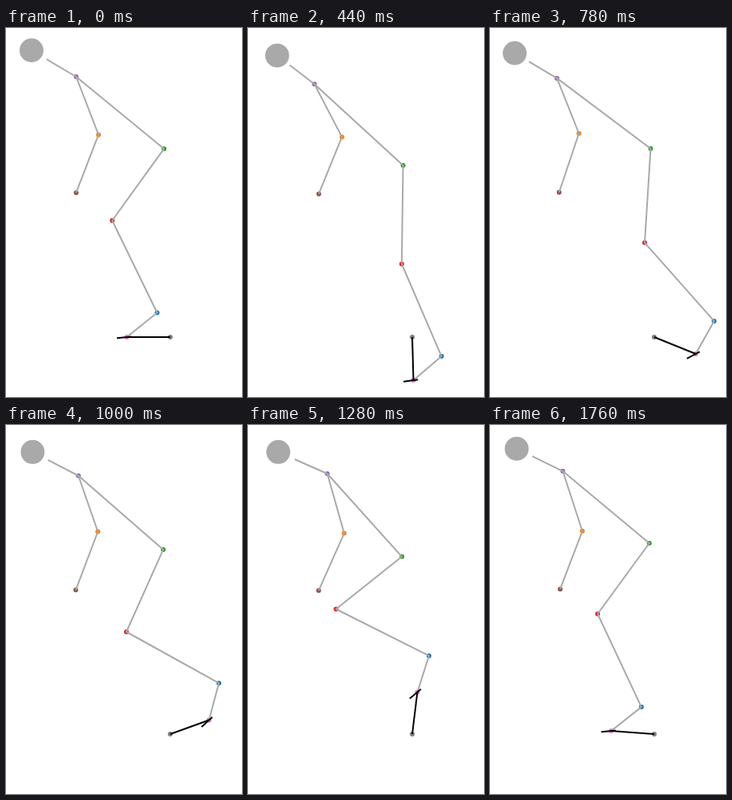
These frames come from a looping animation (296 by 462 pixels, 1.78 s). An HTML page with a canvas:

```html
<!DOCTYPE html>
<html lang="en">
<head>
<meta charset="utf-8">
<title>Pedalling figure</title>
<style>
  html, body { margin: 0; width: 100%; height: 100%; overflow: hidden; background: #fff; }
  canvas { display: block; width: 296px; height: 462px; }
</style>
</head>
<body>
<canvas id="stage" width="296" height="462"></canvas>
<script>
const ctx = document.getElementById('stage').getContext('2d');
const LOOP = 1780, STEP = 20;
const GRAY = '#a9a9a9', BLACK = '#000';
const CRANK = [206, 387];
const KEYS = [0, 440, 780, 1000, 1280, 1500, 1760];

// Natural cubic spline through the key times
function spline(ys) {
  const n = KEYS.length, m = Array(n).fill(0), c = Array(n).fill(0), d = Array(n).fill(0);
  const gap = i => KEYS[i + 1] - KEYS[i];
  const slope = i => (ys[i + 1] - ys[i]) / gap(i);
  for (let i = 1; i < n - 1; i++) {
    const p = 2 * (gap(i - 1) + gap(i)) - gap(i - 1) * c[i - 1];
    c[i] = gap(i) / p;
    d[i] = (6 * (slope(i) - slope(i - 1)) - gap(i - 1) * d[i - 1]) / p;
  }
  for (let i = n - 2; i > 0; i--) m[i] = d[i] - c[i] * m[i + 1];
  return t => {
    let i = 0;
    while (i < n - 2 && t > KEYS[i + 1]) i++;
    const h = gap(i), b = (t - KEYS[i]) / h, a = 1 - b;
    return a * ys[i] + b * ys[i + 1]
      + ((a ** 3 - a) * m[i] + (b ** 3 - b) * m[i + 1]) * h * h / 6;
  };
}

function track(xs, ys) {
  const x = spline(xs), y = spline(ys);
  return t => [x(t), y(t)];
}

const head = track([32, 36.6, 31, 33.4, 38, 34.8, 33.5], [28, 34.4, 31.5, 33.8, 33.8, 29.8, 29.7]);
const shoulder = track([88, 83.3, 84, 90.8, 99.5, 97.6, 91.3], [61, 70.2, 62.9, 63.5, 61, 56.6, 57.8]);
const elbow = track([116, 117.8, 111.5, 115.2, 120.6, 117.4, 115.8], [133.7, 136.4, 132, 133.5, 135.6, 133.3, 132.8]);
const wrist = track([88, 88.8, 86.7, 87.5, 88.6, 88, 88], [206.2, 207.7, 205.8, 206.6, 207.3, 206, 205.4]);
const hip = track([198.2, 194.5, 201.5, 197.2, 193, 198.2, 199.8], [151.2, 172, 151, 155.9, 164.8, 152, 148]);
const knee = track([133.2, 192.8, 194, 151, 110.4, 112.3, 135], [241, 295.5, 268.8, 259, 230.5, 211.8, 236.5]);
const crankAngle = spline([180, 88.4, 22, -19.8, -83, -125.2, -175.8]);
const crankLength = spline([54.5, 54, 56.1, 51.6, 52.9, 56.3, 54.2]);
const footAngle = spline([38.7, 40.4, 60.7, 75, 72.3, 53, 38.3]);
const footLength = spline([48.7, 46.2, 47.1, 48, 47.8, 48.9, 48.3]);

function polar([x, y], degrees, r) {
  const a = degrees * Math.PI / 180;
  return [x + r * Math.cos(a), y + r * Math.sin(a)];
}

function dot([x, y], r, color) {
  ctx.fillStyle = color;
  ctx.beginPath();
  ctx.arc(x, y, r, 0, 2 * Math.PI);
  ctx.fill();
}

function line(color, ...points) {
  ctx.strokeStyle = color;
  ctx.beginPath();
  points.forEach(p => ctx.lineTo(...p));
  ctx.stroke();
}

function draw(t) {
  const skull = head(t), neck = shoulder(t), arm = elbow(t), hand = wrist(t);
  const pelvis = hip(t), leg = knee(t), tilt = -footAngle(t);
  const pedal = polar(CRANK, crankAngle(t), crankLength(t));
  const ankle = polar(pedal, tilt, footLength(t));
  const chin = neck.map((v, i) => v + (skull[i] - v) * 0.663);
  const sole = tilt + 32.5;

  ctx.fillStyle = '#fff';
  ctx.fillRect(0, 0, 296, 462);
  ctx.lineWidth = 2;
  ctx.lineJoin = 'round';

  dot(skull, 15, GRAY);
  dot(ankle, 3, '#1f77b4');
  dot(arm, 3, '#ff7f0e');
  dot(pelvis, 3, '#2ca02c');
  dot(leg, 3, '#d62728');
  dot(neck, 3, '#9467bd');
  dot(hand, 3, '#8c564b');
  dot(pedal, 3, '#e377c2');
  dot(CRANK, 3, '#7f7f7f');

  line(GRAY, chin, neck, pelvis, leg, ankle, pedal);
  line(GRAY, neck, arm, hand);
  line(BLACK, pedal, CRANK);
  line(BLACK, polar(pedal, sole, -12.5), polar(pedal, sole, 5.7));
}

const start = performance.now();
function tick() {
  const t = (performance.now() - start) % LOOP;
  draw(Math.floor(t / STEP) * STEP);
  requestAnimationFrame(tick);
}
tick();
</script>
</body>
</html>
```
